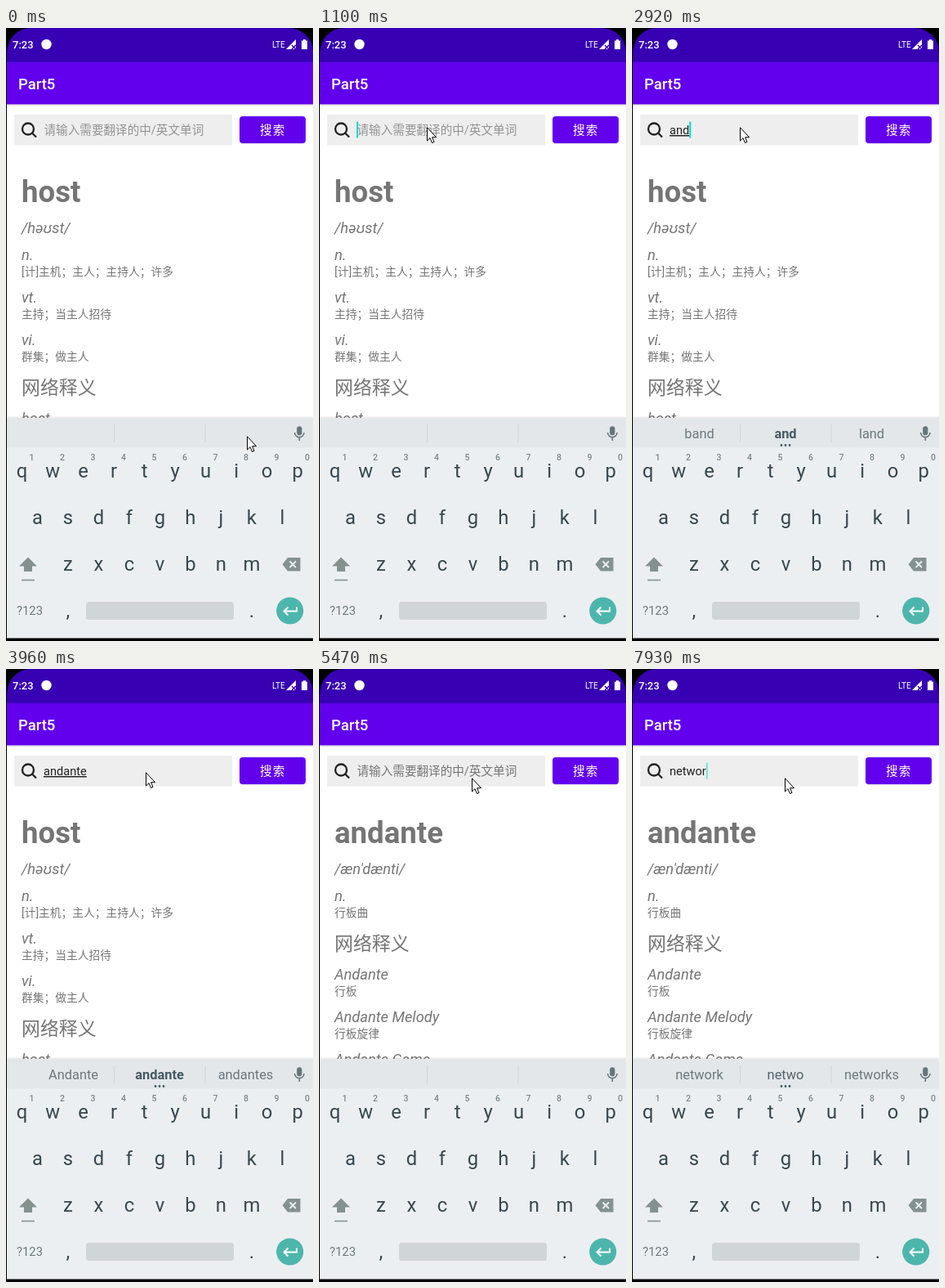
Write an HTML page that moves like this. It is 376 px wide and 750 px high and loops after 8000 ms.

```html
<!DOCTYPE html>
<html lang="zh-CN">
<head>
<meta charset="utf-8">
<style>
html, body { margin: 0; height: 100%; overflow: hidden; background: #fff; }
svg { display: block; width: 100%; height: 100%; font-family: Roboto, "Noto Sans CJK SC", sans-serif; }
text { white-space: pre; }
.page { fill: #757575; }
.word { font-size: 36.6px; font-weight: 700; }
.head { font-size: 22.9px; font-weight: 500; }
.term { font-size: 18.3px; font-style: italic; }
.mean { font-size: 13.75px; }
.field { font-size: 14.6px; }
.mid { text-anchor: middle; }
.key { font-size: 23.8px; fill: #37474f; }
.digit { font-size: 10.5px; font-weight: 500; fill: #7b878c; }
.hint { font-size: 16.4px; fill: #6c787e; }
</style>
</head>
<body>
<svg viewBox="0 0 376 750" preserveAspectRatio="none">
  <defs>
    <linearGradient id="shade" x2="0" y2="1">
      <stop stop-opacity=".14"/><stop offset="1" stop-opacity="0"/>
    </linearGradient>
  </defs>

  <!-- status and app bars -->
  <rect width="376" height="42" fill="#3700b3"/>
  <rect y="41.8" width="376" height="51.6" fill="#6200ee"/>
  <rect y="93.4" width="376" height="3" fill="url(#shade)"/>
  <g fill="#fff">
    <text x="8" y="25" font-size="13" font-weight="500">7:23</text>
    <circle cx="49.5" cy="20" r="6.2"/>
    <text x="326" y="24" font-size="10">LTE</text>
    <path d="M355 14V26H343z"/>
    <path d="M350 21l5 5m0-5l-5 5" stroke="#3700b3" stroke-width="1.5"/>
    <path d="M362 15.5h2v-1.5h3v1.5h2V26h-7z"/>
    <text x="15" y="75" font-size="18.5" font-weight="500">Part5</text>
  </g>

  <!-- search row -->
  <rect x="10" y="106" width="267" height="37.5" fill="#eee"/>
  <g fill="none" stroke="#212121" stroke-width="2.3">
    <circle cx="27" cy="123.5" r="7"/><path d="M32 128.5l5 5"/>
  </g>
  <text id="prompt" class="field" x="46.5" y="130">请输入需要翻译的中/英文单词</text>
  <text id="input" class="field" x="46" y="130" fill="#212121"></text>
  <rect id="caret" y="114.5" width="2" height="20" fill="#03dac5"/>
  <rect x="286" y="109" width="81" height="33" rx="4" fill="#000" opacity=".1"/>
  <rect x="286" y="108" width="81" height="33" rx="4" fill="#6200ee"/>
  <rect id="press" x="286" y="108" width="81" height="33" rx="4" fill="#fff" opacity="0"/>
  <text class="field" x="311" y="130" fill="#fff" font-weight="500" letter-spacing="1.2">搜索</text>

  <g id="host" class="page"></g>
  <g id="wait" class="page"></g>
  <g id="result" class="page"></g>

  <!-- keyboard -->
  <rect y="475.5" width="376" height="2" fill="#000" opacity=".07"/>
  <rect y="477" width="376" height="37" fill="#e3e7e9"/>
  <rect y="513.5" width="376" height="233" fill="#eceff1"/>
  <path d="M132.5 485v22M244 485v22" stroke="#d0d6d9"/>
  <g fill="none" stroke="#66757c" stroke-width="1.6">
    <rect x="357" y="488" width="4.6" height="9.5" rx="2.3" fill="#66757c"/>
    <path d="M353.6 495a5.7 5.7 0 0 0 11.4 0M359.3 501v4"/>
  </g>
  <text id="left" class="hint mid" x="82.5" y="502"></text>
  <text id="center" class="hint mid" x="188" y="502"></text>
  <text id="right" class="hint mid" x="293.5" y="502"></text>
  <path id="dots" d="M183 510.5h.01M188 510.5h.01M193 510.5h.01" stroke="#455a64" stroke-width="2.8" stroke-linecap="round"/>
  <g id="keys"></g>
  <path d="M27 647.5L38 658.5H32V665H22V658.5H16z" fill="#84918f"/>
  <path d="M19 675.5H35" stroke="#84918f" stroke-width="1.6"/>
  <path d="M338.5 656.3L345 648H360.5V664.5H345z" fill="#84918f"/>
  <path d="M347.5 652.5l7.5 7.5m0-7.5l-7.5 7.5" stroke="#eceff1" stroke-width="1.8"/>
  <text class="mid" x="29" y="718" font-size="14.8" fill="#6c787e">?123</text>
  <rect x="98" y="702" width="181" height="22" rx="3.5" fill="#d0d5d8"/>
  <circle cx="347.7" cy="713" r="16.6" fill="#4db6ac"/>
  <path d="M356 708.5v5H340.5m5-5l-5 5l5 5" fill="none" stroke="#fff" stroke-width="2"/>

  <!-- device frame -->
  <path d="M0 0H30A29 31 0 0 0 1 31V746.5H376V750H0zM376 0V29A30 29 0 0 0 346 0z"/>
  <path id="mouse" d="M.5 .8V17L4 13.6L6.5 19.5L9 18.4L6.6 12.7H11.6z" fill="#fff" stroke="#000"/>
</svg>
<script>
const $ = id => document.getElementById(id);
const label = (cls, x, y, s) => `<text class="${cls}" x="${x}" y="${y}">${s}</text>`;
const page = (id, rows) => {
  $(id).innerHTML = rows.map(([cls, y, s]) => label(cls, 19, y, s)).join('');
};

page('host', [
  ['word', 213, 'host'], ['term', 251, '/həʊst/'],
  ['term', 284, 'n.'], ['mean', 303, '[计]主机；主人；主持人；许多'],
  ['term', 336, 'vt.'], ['mean', 355, '主持；当主人招待'],
  ['term', 388, 'vi.'], ['mean', 407, '群集；做主人'],
  ['head', 448, '网络释义'], ['term', 484, 'host']
]);
page('wait', [['word', 212, '搜索中...']]);
page('result', [
  ['word', 213, 'andante'], ['term', 251, '/ænˈdænti/'],
  ['term', 284, 'n.'], ['mean', 303, '行板曲'],
  ['head', 344, '网络释义'],
  ['term', 380, 'Andante'], ['mean', 399, '行板'],
  ['term', 432, 'Andante Melody'], ['mean', 451, '行板旋律'],
  ['term', 484, 'Andante Game']
]);

const row = (chars, x, y, cls = 'key') =>
  [...chars].map((c, i) => label(cls + ' mid', x + 37.5 * i, y, c)).join('');
$('keys').innerHTML = row('qwertyuiop', 19.6, 550) + row('1234567890', 31.5, 529, 'digit') +
  row('asdfghjkl', 38.4, 607) + row('zxcvbnm', 75.9, 664) + row(',', 75.9, 721) + row('.', 300.9, 721);

// time, typed text, left and right suggestions
const typing = [
  [-200, '', '', ''],
  [2480, 'a', 'I', 'an'], [2640, 'an', 'can', 'any'], [2800, 'and', 'band', 'land'],
  [2960, 'anda', 'panda', 'and'], [3100, 'andan', 'andante', 'and'],
  [3240, 'andant', 'andante', 'and'], [3410, 'andante', 'Andante', 'andantes'],
  [4800, '', '', ''],
  [7000, 'n', 'no', 'not'], [7150, 'ne', 'new', 'need'], [7320, 'net', 'bet', 'met'],
  [7490, 'netw', 'network', 'networks'], [7650, 'netwo', 'network', 'networks'],
  [7900, 'networ', 'network', 'networks']
];
const caretOn = [[100, 600], [1090, 1590], [2070, 3955], [4670, 5170], [5670, 6190], [6680, 8000]];
const path = [
  [40, 295, 499], [400, 210, 258], [640, 136, 97], [780, 134, 109], [900, 134, 109],
  [1100, 132, 121], [3930, 132, 121], [3960, 171, 126], [4160, 235, 104], [4300, 285, 98],
  [4460, 326, 118], [4800, 326, 118], [5120, 280, 128], [5460, 187, 133], [8000, 187, 133]
];

const last = t => typing.findLast(e => e[0] <= t);
const clamp = v => Math.min(1, Math.max(0, v));
const show = (id, on) => $(id).setAttribute('visibility', on ? 'visible' : 'hidden');

function mouseAt(t) {
  const i = path.findIndex(p => p[0] > t);
  if (i < 1) return path[0].slice(1);
  const a = path[i - 1], b = path[i], k = (t - a[0]) / (b[0] - a[0]);
  return [a[1] + (b[1] - a[1]) * k, a[2] + (b[2] - a[2]) * k];
}

function draw(now) {
  const t = now % 8000;
  const text = last(t)[1];
  const [, word, left, right] = last(t - 100);

  $('input').textContent = text;
  $('input').setAttribute('text-decoration', t < 7900 ? 'underline' : 'none');
  show('prompt', !text);
  $('prompt').setAttribute('fill', t < 4800 ? '#939393' : '#757575');
  $('caret').setAttribute('x', 46 + (text ? $('input').getComputedTextLength() : 0));
  $('caret').setAttribute('opacity', t >= 7900 || (t >= 4670 && t < 4700) ? .5 : 1);
  show('caret', caretOn.some(([a, b]) => t >= a && t < b));

  $('left').textContent = left;
  $('center').textContent = word;
  $('right').textContent = right;
  $('center').style.cssText = t < 7810 ? 'font-weight:700;fill:#455a64' : 'fill:#546269';
  show('dots', word);

  show('host', t < 4600);
  show('wait', t >= 4600 && t < 4740);
  show('result', t >= 4740);
  $('press').setAttribute('opacity', .15 * clamp((t - 4540) / 100) * clamp((5050 - t) / 250));
  $('mouse').setAttribute('transform', `translate(${mouseAt(t).map(Math.round)})`);
  requestAnimationFrame(draw);
}
requestAnimationFrame(draw);
</script>
</body>
</html>
```
